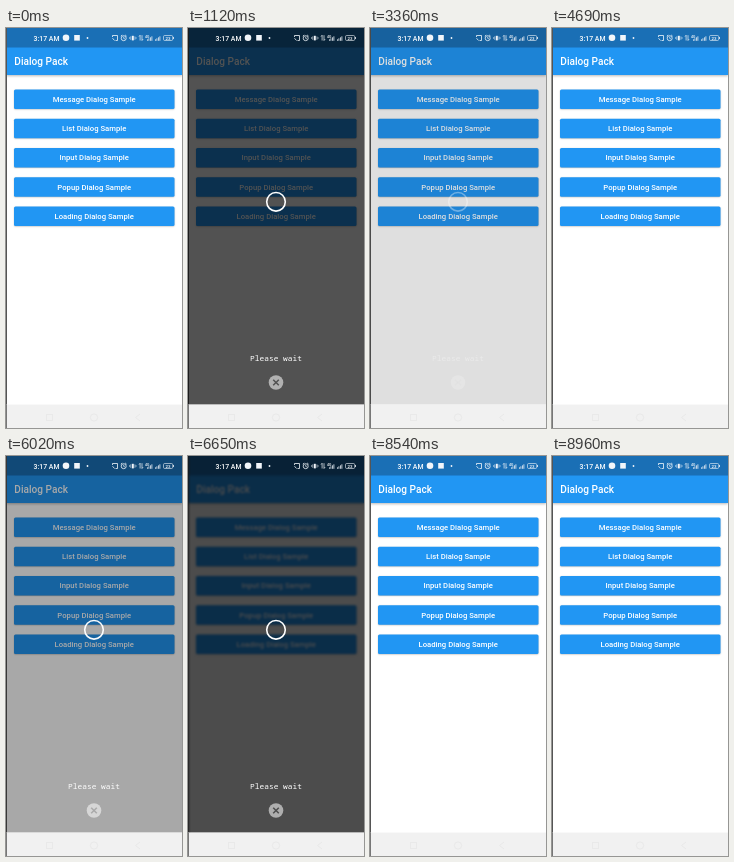
An HTML page with a canvas for the animation above (9.45 s loop, 176 by 400 pixels).

```html
<!DOCTYPE html>
<html lang="en">
<head>
<meta charset="utf-8">
<title>Dialog Pack</title>
<style>
  html, body { margin: 0; width: 100%; height: 100%; overflow: hidden; background: #fff; }
  canvas { display: block; width: 176px; height: 400px; }
</style>
</head>
<body>
<canvas id="stage" width="176" height="400"></canvas>
<script>
const W = 176, H = 400, NAV_Y = 376.6;
const LOOP = 9450, STEP = 70, FADE = 300, DIM = 0.7;
const DIALOGS = [{ open: 829, close: 3114 }, { open: 5874, close: 8150 }];
const TAP = { from: 2980, to: 3330 };
const LABELS = ['Message', 'List', 'Input', 'Popup', 'Loading'];

const ctx = document.getElementById('stage').getContext('2d');
const page = document.createElement('canvas');
page.width = W;
page.height = H;

const clamp = v => Math.max(0, Math.min(1, v));

function rect(c, x, y, w, h, color) {
  c.fillStyle = color;
  c.fillRect(x, y, w, h);
}

function disc(c, x, y, r, color) {
  c.fillStyle = color;
  c.beginPath();
  c.arc(x, y, r, 0, Math.PI * 2);
  c.fill();
}

function ring(c, x, y, r, width, color) {
  c.strokeStyle = color;
  c.lineWidth = width;
  c.beginPath();
  c.arc(x, y, r, 0, Math.PI * 2);
  c.stroke();
}

function line(c, points, width, color) {
  c.strokeStyle = color;
  c.lineWidth = width;
  c.beginPath();
  points.forEach(([x, y]) => c.lineTo(x, y));
  c.stroke();
}

function text(c, str, x, y, font, align = 'left') {
  c.font = font;
  c.textAlign = align;
  c.fillStyle = '#fff';
  c.fillText(str, x, y);
}

function withShadow(c, blur, offset, draw) {
  c.save();
  c.shadowColor = 'rgba(0,0,0,.28)';
  c.shadowBlur = blur;
  c.shadowOffsetY = offset;
  draw();
  c.restore();
}

function drawPage(c) {
  rect(c, 0, 0, W, H, '#fff');
  withShadow(c, 2.5, 1, () => rect(c, 0, 0, W, 47, '#2196f3'));
  rect(c, 0, 0, W, 19.5, '#1a6fb5');
  text(c, 'Dialog Pack', 8.3, 36.8, '500 10.1px Roboto, sans-serif');
  LABELS.forEach((label, i) => {
    const y = 61.5 + i * 29.25;
    withShadow(c, 1.5, 0.6, () => {
      c.fillStyle = '#2196f3';
      c.beginPath();
      c.roundRect(8, y, 160.5, 19.4, 1.5);
      c.fill();
    });
    text(c, label + ' Dialog Sample', 88.2, y + 12.4,
      '500 7.7px Roboto, sans-serif', 'center');
  });
  rect(c, 0, 0, 1, H, '#555');
}

function drawSignal(x) {
  for (let i = 0; i < 4; i++) rect(ctx, x + i * 1.5, 11.3 - i, 0.8, 1.5 + i, '#e8eef4');
}

function drawStatus() {
  const white = '#f2f6fa';
  text(ctx, '3:17 AM', 27.5, 12.6, '500 6.9px Roboto, sans-serif');
  disc(ctx, 60, 9.8, 3.3, white);
  rect(ctx, 68.2, 7, 5.6, 5.6, white);
  disc(ctx, 81.5, 10, 0.9, white);

  // cast
  line(ctx, [[106.5, 9], [106.5, 7.5], [111.5, 7.5], [111.5, 12.5], [109.5, 12.5]], 0.8, white);
  line(ctx, [[106.5, 10.2], [108.5, 12.5]], 0.8, white);
  // alarm
  ring(ctx, 117.7, 10.2, 2.5, 0.8, white);
  line(ctx, [[117.7, 8.7], [117.7, 10.4], [118.9, 10.9]], 0.7, white);
  line(ctx, [[114.8, 8.2], [116.2, 7]], 0.8, white);
  line(ctx, [[119.2, 7], [120.6, 8.2]], 0.8, white);
  // vibrate
  rect(ctx, 125.8, 7.8, 2, 4.6, white);
  [-1, 1].forEach(side => {
    line(ctx, [[126.8 + side * 2.1, 8.3], [126.8 + side * 2.1, 11.9]], 0.5, white);
    line(ctx, [[126.8 + side * 3.2, 9], [126.8 + side * 3.2, 11]], 0.5, white);
  });
  // data arrows
  line(ctx, [[133, 8.6], [134.1, 7.2], [134.1, 12.5]], 0.7, white);
  line(ctx, [[136, 7.2], [136, 12.5], [137.1, 11.1]], 0.7, white);
  text(ctx, '4G', 139, 9.6, '500 3.5px Roboto, sans-serif');
  drawSignal(141);
  drawSignal(149);
  // battery
  ctx.strokeStyle = white;
  ctx.lineWidth = 0.6;
  ctx.beginPath();
  ctx.roundRect(157.5, 7.5, 9.2, 5, 1.2);
  ctx.stroke();
  rect(ctx, 167, 9, 0.8, 2, white);
  text(ctx, '23', 162.1, 11.6, '500 4.4px Roboto, sans-serif', 'center');
}

function drawNav() {
  const faint = '#e9e9e9';
  rect(ctx, 0, NAV_Y, W, H - NAV_Y, '#f1f1f1');
  ctx.strokeStyle = faint;
  ctx.lineWidth = 1;
  ctx.strokeRect(40.5, 386.5, 6, 6);
  ring(ctx, 88, 389.5, 3.6, 1, faint);
  line(ctx, [[134, 386], [129.5, 389.5], [134, 393]], 1, faint);
  rect(ctx, 0, NAV_Y, 1, H - NAV_Y, '#777');
}

function drawDialog(progress, tap) {
  const dim = DIM * progress;
  const shade = 255 * (1 - dim);
  const backdrop = `rgb(${shade},${shade},${shade})`;
  rect(ctx, 0, 0, W, NAV_Y, `rgba(0,0,0,${dim})`);

  // the content reaches full strength ahead of the barrier
  ctx.globalAlpha = clamp(progress * 2);
  ring(ctx, 88, 173.8, 9.3, 1.6, '#fff');
  text(ctx, 'Please wait', 88, 332.8, '7.85px "Noto Sans Mono", monospace', 'center');
  if (tap > 0) {
    ctx.globalAlpha = tap;
    disc(ctx, 88, 361.5, 6.3, '#c6c6c6');
    ctx.globalAlpha = clamp(progress * 2);
  }
  disc(ctx, 88, 354.5, 7.3, 'rgba(255,255,255,.55)');
  line(ctx, [[85.2, 351.7], [90.8, 357.3]], 1.5, backdrop);
  line(ctx, [[90.8, 351.7], [85.2, 357.3]], 1.5, backdrop);
  ctx.globalAlpha = 1;
}

function render(time) {
  const t = Math.floor((time % LOOP) / STEP) * STEP;
  const dialog = DIALOGS.find(d => t > d.open && t < d.close + FADE);
  ctx.drawImage(page, 0, 0);
  if (dialog) {
    const progress = Math.min(clamp((t - dialog.open) / FADE),
      1 - clamp((t - dialog.close) / FADE));
    // the backdrop blurs only while the dialog is fully open
    if (progress === 1) {
      ctx.filter = 'blur(1.2px)';
      ctx.drawImage(page, 0, 0);
      ctx.filter = 'none';
    }
    const tap = t >= TAP.from ? clamp((TAP.to - t) / 180) : 0;
    drawDialog(progress, dialog === DIALOGS[0] ? tap : 0);
  }
  drawStatus();
  drawNav();
}

drawPage(page.getContext('2d'));
const start = performance.now();
function tick() {
  render(performance.now() - start);
  requestAnimationFrame(tick);
}
tick();
</script>
</body>
</html>
```
